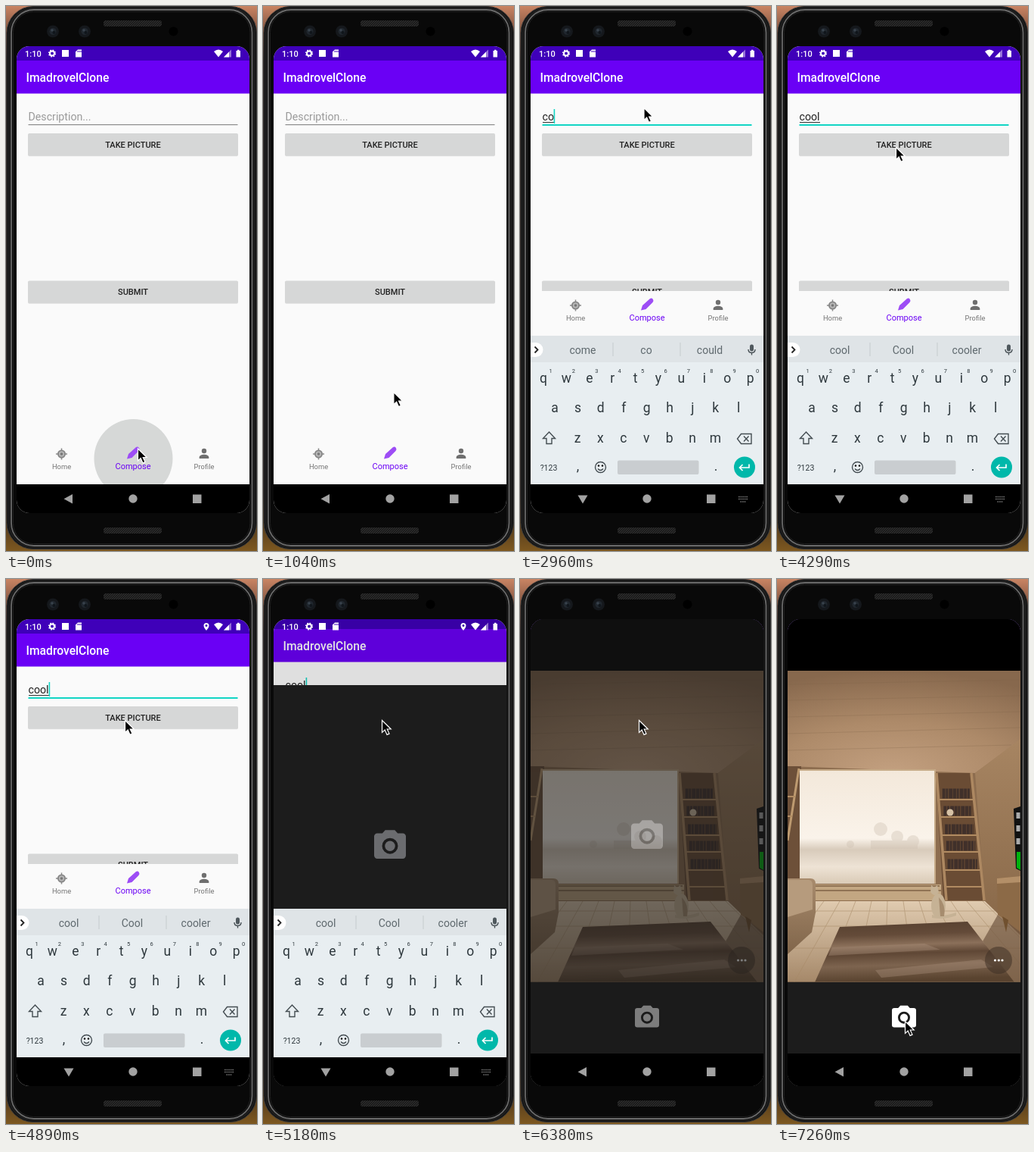
Recreate the animation shown at these times as an HTML page. Size 332 by 719 pixels, loop 8000 ms.

```html
<!DOCTYPE html>
<html lang="en">
<head>
<meta charset="utf-8">
<title>Compose a post</title>
<style>
  html, body { margin: 0; width: 100%; height: 100%; overflow: hidden; background: #0b0b0b; }
  svg { display: block; width: 332px; height: 719px; font-family: Roboto, sans-serif; }
  .mid { text-anchor: middle; }
  .caps { font-size: 11px; font-weight: 500; fill: #212121; text-anchor: middle; }
  .words { font-size: 14px; fill: #5f696e; text-anchor: middle; }
  .line { fill: none; stroke: #444d52; stroke-width: 1.4; }
</style>
</head>
<body>
<svg viewBox="0 0 332 719">
  <defs>
    <clipPath id="screenClip"><rect x="14" y="53" width="308" height="616" rx="17"/></clipPath>
    <clipPath id="cameraClip"><rect id="cameraWindow" x="14" y="53" width="308" height="616"/></clipPath>
    <clipPath id="photoClip"><rect x="14" y="121" width="308" height="410.5"/></clipPath>
    <linearGradient id="desk" x2="0" y2="1"><stop stop-color="#c98463"/><stop offset=".1" stop-color="#2b1d18"/><stop offset=".9" stop-color="#2b1d18"/><stop offset="1" stop-color="#7d5820"/></linearGradient>
    <radialGradient id="ceiling" cx=".45" cy="1" r="1"><stop stop-color="#c3a080"/><stop offset=".5" stop-color="#ad8a69"/><stop offset="1" stop-color="#87684d"/></radialGradient>
    <linearGradient id="wall" x2="0" y2="1"><stop stop-color="#a78562"/><stop offset="1" stop-color="#876748"/></linearGradient>
    <linearGradient id="sky" x2="0" y2="1"><stop stop-color="#f3e8da"/><stop offset=".6" stop-color="#faf3ea"/><stop offset=".7" stop-color="#d8cbbb"/><stop offset=".85" stop-color="#eee3d5"/><stop offset="1" stop-color="#d9cab6"/></linearGradient>
    <linearGradient id="floor" x2="0" y2="1"><stop stop-color="#e0cbb0"/><stop offset="1" stop-color="#a58869"/></linearGradient>
    <linearGradient id="sofa" x2="0" y2="1"><stop stop-color="#a88b6d"/><stop offset="1" stop-color="#80654a"/></linearGradient>
    <linearGradient id="rug" x2=".1" y2="1"><stop stop-color="#553f2f"/><stop offset=".25" stop-color="#644b39"/><stop offset=".42" stop-color="#8b705a"/><stop offset=".56" stop-color="#5f4735"/><stop offset=".75" stop-color="#7d644f"/><stop offset="1" stop-color="#59432f"/></linearGradient>
    <pattern id="mesh" width="3" height="3" patternUnits="userSpaceOnUse"><rect width="3" height="3" fill="#2b2b2b"/><path d="M0 3 3 0" stroke="#111"/></pattern>
    <g id="cameraIcon">
      <path d="M9 2 7.17 4H4a2 2 0 0 0-2 2v12a2 2 0 0 0 2 2h16a2 2 0 0 0 2-2V6a2 2 0 0 0-2-2h-3.17L15 2zM12 17a5 5 0 1 1 0-10 5 5 0 0 1 0 10z"/>
      <circle cx="12" cy="12" r="3.2"/>
    </g>
  </defs>

  <!-- Phone body -->
  <rect width="332" height="719" fill="url(#desk)"/>
  <rect x="1" y=".5" width="330.5" height="716" rx="35" fill="#121212" stroke="#3a3a3a"/>
  <rect x="4" y="3" width="324.5" height="711" rx="32" fill="none" stroke="#1f1f1f" stroke-width="2"/>
  <rect x="7" y="5" width="318.500" height="707" rx="30" fill="#090909" stroke="#6a6a6a" stroke-width="1.800"/>
  <rect x="9.500" y="7.500" width="313.500" height="702" rx="27" fill="none" stroke="#222"/>
  <g fill="url(#mesh)"><rect x="129" y="19" width="77" height="8" rx="3"/><rect x="129" y="688" width="77" height="8" rx="3"/></g>
  <g id="lenses"></g>
  <circle cx="221.500" cy="33.500" r="6" fill="#000"/>

  <g clip-path="url(#screenClip)">
    <!-- App -->
    <rect x="14" y="53" width="308" height="616" fill="#fafafa"/>
    <g id="app">
      <rect x="14" y="72" width="308" height="43.500" fill="#6a00f5"/>
      <rect x="14" y="53" width="308" height="19" fill="#3f00b9"/>
      <text x="26.500" y="100" font-size="15.700" font-weight="500" fill="#fff">ImadrovelClone</text>
      <text id="field" x="29.500" y="151" font-size="14.200"></text>
      <path id="composing" d="M30 153.500h27" stroke="#333"/>
      <rect id="fieldLine" x="29.500" width="277"/>
      <rect id="caret" y="136" width="1.600" height="19" fill="#12d5c4"/>
      <rect x="29" y="169" width="278" height="29.300" rx="2" fill="#000" opacity=".12"/>
      <rect id="takeButton" x="29" y="168" width="278" height="29.500" rx="2"/>
      <text class="caps" x="168" y="187">TAKE PICTURE</text>
      <rect x="29" y="363" width="278" height="29.800" rx="2" fill="#000" opacity=".12"/>
      <rect x="29" y="362.500" width="278" height="29.500" rx="2" fill="#d6d7d7"/>
      <text class="caps" x="168" y="381">SUBMIT</text>
      <g id="tabs">
        <rect x="14" y="572" width="308" height="59" fill="#fafafa"/>
        <circle id="ripple" cx="168.500" cy="597" r="52" fill="#d6d8d7"/>
        <path d="M73.500 583.500v15M66 591h15" stroke="#8b8b8b" stroke-width="1.500"/>
        <circle cx="73.500" cy="591" r="4.600" fill="#b5b5b5" stroke="#858585" stroke-width="1.800"/>
        <circle cx="73.500" cy="591" r="1.800" fill="#777"/>
        <path d="M160 597.500l2-6.500 9.500-8.500q2.500-2 4.200.2t-.2 4.300L166.500 596z" fill="#9d4df5"/>
        <g fill="#6f6f6f"><circle cx="262" cy="587" r="3.200"/><path d="M255.700 597v-1.500c0-5 12.600-5 12.600 0v1.500z"/></g>
        <g class="mid" font-size="9.400" fill="#757575">
          <text x="73.500" y="611">Home</text><text x="262" y="611">Profile</text>
          <text x="168" y="611" font-size="11" fill="#6a00f5">Compose</text>
        </g>
      </g>
    </g>
    <rect id="dim" x="14" y="53" width="308" height="578" opacity=".11"/>

    <!-- Status icons -->
    <g fill="#fff">
      <text x="25" y="66.500" font-size="11" font-weight="500">1:10</text>
      <circle cx="61" cy="62.500" r="3" fill="none" stroke="#fff" stroke-width="2"/>
      <circle cx="61" cy="62.500" r="4.300" fill="none" stroke="#fff" stroke-width="1.600" stroke-dasharray="1.700 1.677"/>
      <rect x="74" y="58" width="9" height="9"/>
      <path d="M92 60.500l3-3h5v10h-8z"/>
      <path d="M95 59v2M97 59v2M99 59v2" stroke="#3f00b9"/>
      <path d="M275 60q6-5 12 0l-6 7.500z"/>
      <path d="M298 57.500v10h-10z" opacity=".45"/><path d="M295 60.500v7h-7z"/>
      <path d="M304.500 59h1.500v-1.200h2.500V59h1.500v8.500h-5.500z"/>
      <path id="pin" fill-rule="evenodd" d="M265 68q-3.500-4-3.500-6.500a3.500 3.500 0 0 1 7 0q0 2.500-3.500 6.500zm0-8a1.500 1.500 0 1 0 .01 0z"/>
    </g>

    <!-- Camera -->
    <g id="camera" clip-path="url(#cameraClip)">
      <rect x="14" y="53" width="308" height="616" fill="#1c1c1c"/>
      <g id="cameraContent">
        <g id="viewfinder">
          <rect x="14" y="53" width="308" height="69" fill="#000"/>
          <g clip-path="url(#photoClip)">
            <rect x="14" y="121" width="308" height="411" fill="#8d6d4f"/>
            <path d="M14 121H322V212L262 256 14 247z" fill="url(#ceiling)"/>
            <path d="M14 139 322 133M14 160 322 154M14 182 322 175M14 204 322 196M14 226 310 219" stroke="#7f6448" stroke-width=".7" opacity=".4"/>
            <path d="M262 256 322 211V470L275 425z" fill="url(#wall)"/>
            <path d="M14 425H275L322 470V532H14z" fill="url(#floor)"/>
            <path id="planks" stroke="#a88b68" stroke-width=".8" opacity=".7"/>
            <path d="M292 443 322 466V532H312L272 478z" fill="#6b513b" opacity=".65"/>
            <path d="M14 247H32V402H14z" fill="#6d5039"/>
            <path d="M29 250 14 345" stroke="#bd9a70" stroke-width="3"/>
            <path d="M14 287h10M14 313h6" stroke="#b28d63" stroke-width="2"/>
            <rect x="30" y="252" width="180" height="150" fill="url(#sky)"/>
            <g fill="#cfc2b3" opacity=".4"><circle cx="137" cy="330" r="9"/><circle cx="159" cy="340" r="8"/><circle cx="180" cy="346" r="8"/><circle cx="97" cy="350" r="5"/><path d="M124 345H186V356H124z"/></g>
            <path d="M30 252H209V402" fill="none" stroke="#c6ab88" stroke-width="2"/>
            <path d="M30 403H217V424H50z" fill="#c3a782"/>
            <path d="M36 405H215M48 411H217" stroke="#806345" stroke-width="1.700"/>
            <path d="M210 256H257L274 424H220z" fill="#6a4c34"/>
            <path id="books" stroke="#40302a" stroke-width="13" stroke-dasharray="4 .7 3 1 5 .6"/>
            <path id="shelves" stroke="#b18b61" stroke-width="2.200"/>
            <path d="M211 256 224 424M257 256 274 424" stroke="#ad8861" stroke-width="3.500"/>
            <circle cx="229" cy="308" r="4.500" fill="#d6c2a6"/>
            <path d="M14 395H44q7 0 7 7V440L46 466 14 495z" fill="url(#sofa)"/>
            <path d="M14 397H42q5 0 5 7V436L14 446z" fill="#b69b7d"/>
            <path d="M83 459 252 452 314 532H50z" fill="url(#rug)"/>
            <path d="M73 486 195 481 216 489 68 497zM130 516 270 502 286 512 138 526z" fill="#b09580" opacity=".35"/>
            <g fill="#c6b295">
              <path d="M203 413l1-9 4 3 4-3 2 9q-5 8-11 0z"/>
              <ellipse cx="213.500" cy="431" rx="9.500" ry="16"/>
              <path d="M205 443q10 4 32-3v4q-16 6-32 3z"/>
            </g>
            <path d="M214 420q10 10 7 25h-5z" fill="#a68c6e"/>
            <path d="M291 395 322 392V465L292 443z" fill="#8c6a47"/><path d="M291 395 322 392V400L291 402z" fill="#b38f68"/>
            <path d="M298 445 303 466 306 450z" fill="#70502f"/>
            <path d="M313 303 322 300V385L316 382z" fill="#111"/>
            <path d="M319 308V358" stroke="#aaa" stroke-width="5" stroke-dasharray="8 9"/>
            <path d="M317 360H322V384L317 381z" fill="#00b20e"/>
          </g>
          <circle cx="293" cy="503" r="18" fill="#3a2c22" opacity=".5"/>
          <g fill="#fff"><circle cx="288.500" cy="503" r="1.600"/><circle cx="293.300" cy="503" r="1.600"/><circle cx="298" cy="503" r="1.600"/></g>
          <use href="#cameraIcon" fill="#fff" transform="translate(148.800 559.500) scale(1.600)"/>
        </g>
        <g id="cover">
          <rect x="14" y="40" width="308" height="590" fill="#1c1c1c"/>
          <use href="#cameraIcon" fill="#6b6c6f" transform="translate(142.800 314) scale(2.100)"/>
        </g>
        <rect x="14" y="626" width="308" height="43" fill="#000"/>
      </g>
    </g>

    <!-- Keyboard -->
    <g id="keyboard">
      <rect x="14" y="435" width="308" height="196" fill="#e8eef1"/>
      <rect x="14" y="435" width="308" height="35" fill="#dfe4e7"/>
      <path d="M14 444h7a9.500 9.500 0 0 1 0 19h-7z" fill="#fff"/>
      <path d="M19.500 449.500l4 4-4 4" fill="none" stroke="#222" stroke-width="1.800"/>
      <path d="M123 444v18M212 444v18" stroke="#c5cbce"/>
      <g id="suggestions" class="words"></g>
      <rect x="304" y="446.500" width="5" height="9" rx="2.500" fill="#50595e"/>
      <path class="line" d="M302 453q0 4.500 4.500 4.500t4.500-4.500M306.500 457.500v3"/>
      <g id="keys" class="mid" fill="#2e383d" font-size="17.500"></g>
      <path class="line" d="M38.500 562l8 8.500h-4.500v7h-7v-7h-4.500z"/>
      <path class="line" d="M287.500 571l5-6.500h13.500v13h-13.500zM296 567.500l6.500 7M302.500 567.500l-6.500 7"/>
      <circle class="line" cx="106.500" cy="608.500" r="7"/>
      <path class="line" d="M103 610.500q3.500 4 7 0"/>
      <circle cx="104" cy="606.500" r="1.200"/><circle cx="109" cy="606.500" r="1.200"/>
      <rect x="129" y="599.500" width="107.500" height="18.500" rx="2" fill="#c9cdd0"/>
      <circle cx="297" cy="608.500" r="14" fill="#00b8aa"/>
      <path d="M303 604.500v4.500h-12M294.500 605l-4 4 4 4" fill="none" stroke="#fff" stroke-width="1.700"/>
    </g>

    <!-- System navigation -->
    <rect x="14" y="631" width="308" height="38" fill="#000"/>
    <g fill="#a2a2a2">
      <path id="back" d="M88 644v12.500l-11.500-6.250z"/>
      <path id="hide" d="M76.500 645.500h13l-6.500 11z"/>
      <circle cx="168" cy="650" r="5.700"/>
      <rect x="247" y="644.500" width="11.500" height="11.500"/>
      <path id="imeIcon" d="M289 647.500h12M289 650.500h12M291.500 654h7" stroke="#777" stroke-width="1.600" stroke-dasharray="1.600 1"/>
    </g>
  </g>
  <path id="pointer" d="M0 0v16l3.700-3.400 2.800 6.300 3-1.300-2.800-6.100h5z" fill="#000" stroke="#fff" stroke-width="1.200"/>
</svg>

<script>
const $ = id => document.getElementById(id);
const set = (id, attrs) => { for (const k in attrs) $(id).setAttribute(k, attrs[k]); };
const show = (id, on) => { $(id).style.display = on ? '' : 'none'; };
const label = (x, y, text, size) =>
  `<text x="${x}" y="${y}"${size ? ` font-size="${size}"` : ''}>${text}</text>`;

$('lenses').innerHTML = [62, 104].map(x =>
  `<circle cx="${x}" cy="33.500" r="8" fill="#15181c"/><circle cx="${x}" cy="33.500" r="4.500" fill="#20272e"/>
   <circle cx="${x - 1}" cy="32" r="1.700" fill="#39434d"/><circle cx="${x + 1.5}" cy="35" r="2" fill="#10151b"/>`).join('');

// Keyboard rows start at different offsets but share one pitch
const pitch = 30.4;
const keyRows = [['qwertyuiop', 31, 497], ['asdfghjkl', 46, 536], ['zxcvbnm', 76, 575.5]];
$('keys').innerHTML = keyRows.map(([row, x, y], r) => [...row].map((key, i) =>
  label(x + i * pitch, y, key) + (r ? '' : label(x + 9.5 + i * pitch, 484, (i + 1) % 10, 7.5))).join('')).join('')
  + label(38, 612.5, '?123', 10.5) + label(76.5, 613, ',') + label(259, 613, '.');

// Room details that repeat
const shelfY = [291, 314, 338, 360, 384, 406];
const shelfX = y => [212 + (y - 256) * .075, 257 + (y - 256) * .1];
set('shelves', { d: shelfY.map(y => `M${shelfX(y)[0]} ${y}H${shelfX(y)[1]}`).join('') });
set('books', { d: shelfY.slice(0, 5).map(y => `M${shelfX(y)[0] + 4} ${y - 8}H${shelfX(y)[1] - 5}`).join('') });
let planks = 'M14 438H288M14 458H308M14 487H322';
for (let x = 20; x < 300; x += 21) planks += `M${x} 425L${150 + (x - 150) * 1.9} 532`;
set('planks', { d: planks });

// Screen updates happen only at these moments
const loop = 8000;
const updates = [0, 150, 900, 1050, 1190, 1340, 1480, 1630, 1770, 2070, 2220, 2370,
  2810, 2960, 3110, 3250, 3400, 3850, 4000, 4150, 4290, 4440, 4590, 4740, 4890,
  5180, 5330, 5480, 6380, 6530, 6680, 6820, 6970, 7120, 7260];
const pointerPath = [[0, 174.5, 584], [780, 174.5, 584], [1190, 169, 330], [1480, 164, 115], [1630, 164, 134.5],
  [3720, 164, 134.5], [4290, 157.5, 186.5], [6550, 157.5, 186.5], [6900, 161, 400], [7260, 169.5, 583.5]];
const typing = [[0, ''], [2810, 'c'], [2960, 'co'], [3250, 'coo'], [3400, 'cool']];
const predictions = {
  '': ['I', 'The', "I'm"], c: ['can', 'c', 'call'], co: ['come', 'co', 'could'],
  coo: ['cool', 'coo', 'cook'], cool: ['cool', 'Cool', 'cooler']
};
const textWidth = { '': 0, c: 7, co: 15, coo: 23, cool: 27 };

const within = (t, from, to) => t >= from && t < to;
const clamp = v => Math.max(0, Math.min(1, v));

function pointAt(path, t) {
  const i = path.findIndex(p => p[0] > t);
  if (i < 0) return path.at(-1).slice(1);
  const [a, b] = [path[i - 1], path[i]], k = (t - a[0]) / (b[0] - a[0]);
  return [1, 2].map(n => a[n] + (b[n] - a[n]) * k);
}

function drawField(t) {
  const text = typing.findLast(s => s[0] <= t)[1];
  const focused = t >= 1770;
  $('field').textContent = text || 'Description...';
  set('field', { fill: text ? '#222' : '#9a9a9a' });
  set('fieldLine', focused ? { y: 156, height: 2, fill: '#12d5c4' } : { y: 156, height: 1.2, fill: '#8c8c8c' });
  set('composing', { d: `M30 153.500h${textWidth[text]}` });
  show('composing', text && t < 5180);
  set('caret', { x: 29.6 + textWidth[text] });
  show('caret', focused && !within(t, 2220, 2810) && !within(t, 3850, 4440));
  $('suggestions').innerHTML = predictions[text].map((word, i) => label(83 + i * 84, 459, word)).join('');
}

function drawApp(t) {
  const keyboardOn = within(t, 2070, 5330);
  show('ripple', t < 150);
  set('tabs', { transform: `translate(0 ${t >= 2070 ? -196 : 0})` });
  set('takeButton', { fill: within(t, 4440, 4890) ? '#c3c4c4' : '#d6d7d7' });
  set('app', { transform: `translate(0 ${t < 5180 ? 0 : t < 5330 ? -6 : -13})` });
  show('dim', t >= 5180);
  show('pin', t >= 4890);
  const rise = clamp((t - 2070) / 300);
  set('keyboard', { transform: `translate(0 ${196 * (1 - rise) ** 2})` });
  show('keyboard', keyboardOn);
  show('hide', keyboardOn);
  show('imeIcon', keyboardOn);
  show('back', !keyboardOn);
}

function drawCamera(t) {
  const slide = t < 5330 ? 13 : t < 5480 ? 3 : 0;
  const top = t < 5330 ? 140 : t < 5480 ? 68 : 53;
  show('camera', t >= 5180);
  set('cameraWindow', { y: top, height: 669 - top });
  set('cameraContent', { transform: `translate(0 ${slide})` });
  show('viewfinder', t >= 6380);
  set('cover', { opacity: clamp(1 - (t - 6250) / 300) });
}

let shown = -1;
function frame(now) {
  const time = now % loop;
  const t = updates.findLast(u => u <= time) ?? 0;
  if (t !== shown) {
    shown = t;
    drawField(t);
    drawApp(t);
    drawCamera(t);
    set('pointer', { transform: `translate(${pointAt(pointerPath, t)})` });
  }
  requestAnimationFrame(frame);
}
frame(0);
</script>
</body>
</html>
```
